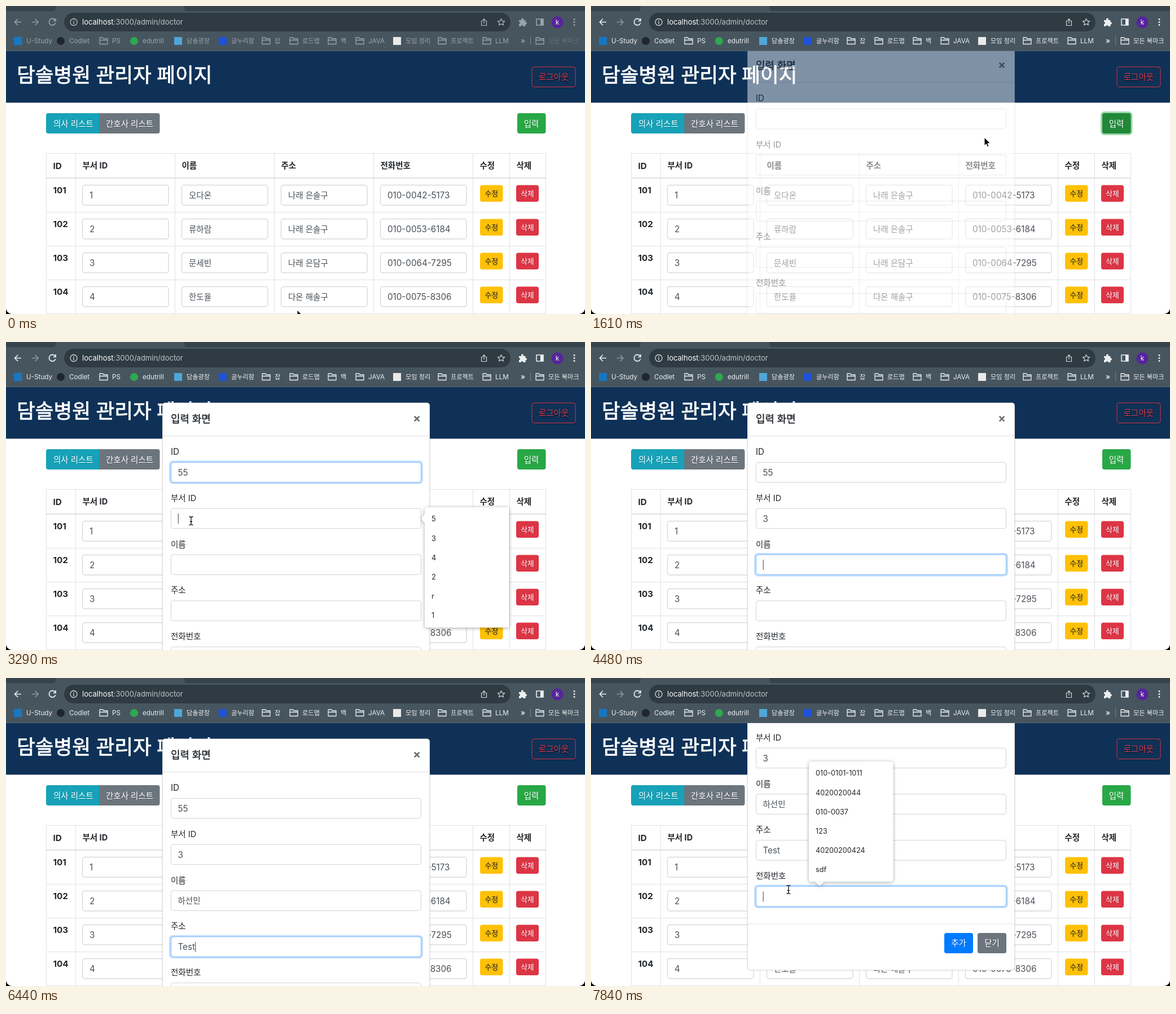
Animation, 1026 px wide and 546 px high, one loop 8 s. Source, as an HTML page:

```html
<!DOCTYPE html>
<html lang="ko">
<head>
<meta charset="utf-8">
<title>관리자 페이지</title>
<style>
  html, body { margin: 0; width: 100%; height: 100%; overflow: hidden; background: #fff; }
  svg { display: block; width: 100%; height: 100%; }
  text { font-family: Inter, "Noto Sans CJK KR", "Noto Sans KR", "Noto Sans CJK JP", sans-serif; white-space: pre; }
  .shade { text-shadow: 1px 1px 2px rgba(0, 0, 0, .15); }
  .raised { filter: drop-shadow(0 1px 1px rgba(0, 0, 0, .22)); }
  .popup { filter: drop-shadow(0 1px 3px rgba(0, 0, 0, .35)); }
</style>
</head>
<body>
<svg viewBox="0 0 1026 546">
  <defs><clipPath id="view"><rect y="80" width="1026" height="466"/></clipPath></defs>
  <g id="page"></g>
  <g id="toolbar"></g>
  <g id="live"></g>
  <path d="M0 537V546H10Q2 545 0 537ZM1026 537V546H1016Q1024 545 1026 537Z"/>
</svg>
<script>
const LOOP = 8000;
const INK = '#212529', VALUE = '#495057', LINE = '#dee2e6';
const el = id => document.getElementById(id);
const clamp = v => Math.min(1, Math.max(0, v));
const ramp = (t, start, length = 150) => clamp((t - start) / length);

// Hangul glyphs are set slightly smaller than Latin ones.
const fit = (s, size) => /[ㄱ-힣]/.test(s) ? size * .955 : size;
const text = (x, y, s, size = 15.2, fill = INK, more = '') =>
  `<text x="${x}" y="${y}" font-size="${fit(s, size)}" fill="${fill}" ${more}>${s}</text>`;
const rect = (x, y, w, h, fill, r = 0, more = '') =>
  `<rect x="${x}" y="${y}" width="${w}" height="${h}" rx="${r}" fill="${fill}" ${more}/>`;
const path = (d, stroke, more = '') => `<path d="${d}" fill="none" stroke="${stroke}" ${more}/>`;
const button = (x, y, w, h, fill, label, size = 15.2, ink = '#fff') =>
  rect(x, y, w, h, fill, 3.8) +
  text(x + w / 2, y + h / 2 + size * .36, label, size, ink, 'text-anchor="middle" class="shade"');

function drawPage() {
  const cols = [71.5, 123.5, 299.5, 475.5, 651.5, 827.5, 892.5, 956.5];
  const heads = ['ID', '부서 ID', '이름', '주소', '전화번호', '수정', '삭제'];
  const rows = [
    ['오다온', '나래 은솔구', '010-0042-5173'],
    ['류하람', '나래 은솔구', '010-0053-6184'],
    ['문세빈', '나래 은담구', '010-0064-7295'],
    ['한도율', '다온 해솔구', '010-0075-8306'],
  ];
  let s = rect(0, 0, 1026, 546, '#fff') + rect(0, 80, 1026, 91.4, '#0f3157') +
    text(19, 135, '담솔병원 관리자 페이지', 37.3, '#fff', 'font-weight="500" stroke="#fff" stroke-width=".8"') +
    rect(932, 108, 77, 35.5, 'none', 4, 'stroke="#dc3545" class="raised"') +
    text(970.5, 131, '로그아웃', 15.2, '#dc3545', 'text-anchor="middle" style="text-shadow:1px 2px 2px rgba(0,0,0,.6)"') +
    button(71, 190, 99, 36, '#17a2b8', '') +
    rect(165.5, 190, 20, 36, '#6c757d') + button(165.5, 190, 107, 36, '#6c757d', '') +
    text(84, 213.5, '의사 리스트', 15.2, '#fff', 'class="shade"') +
    text(177, 213.5, '간호사 리스트', 15.2, '#fff', 'class="shade"');
  for (const x of cols) s += path(`M${x} 261V546`, LINE);
  for (const y of [261.5, 365.5, 425.5, 485.5, 545.5]) s += path(`M71 ${y}H957`, LINE);
  s += path('M71 305H957', LINE, 'stroke-width="2"');
  heads.forEach((h, i) => s += text(cols[i] + 12, i ? 287.5 : 289, h, 15.2, INK, 'font-weight="700"'));
  rows.forEach((row, r) => {
    const y = 317.5 + 60 * r;
    s += text(83.5, y + 14.5, 101 + r, 15.2, INK, 'font-weight="700"');
    [r + 1, ...row].forEach((v, i) => {
      const x = cols[i + 1] + 12;
      s += rect(x, y, 152.5, 35.5, '#fff', 4, 'stroke="#d5dadf" stroke-width="1.4"') +
        text(x + 12.5, y + 23.5, v, 15.2, VALUE);
    });
    s += button(840, y, 40.5, 29.5, '#ffc107', '수정', 13.4, INK) +
      button(904, y, 40, 29.5, '#dc3545', '삭제', 13.4);
  });
  el('page').innerHTML = s;
}

function drawToolbar(active) {
  const ink = active ? '#eceff1' : '#9aa4aa';
  const soft = active ? '#cfd5d8' : '#b4bcc1';
  const folder = x => path(`M${x - 7} 57V67.5H${x + 7}V58H${x}L${x - 1.5} 56H${x - 7}ZM${x - 7} 60.5H${x + 7}`,
    ink, 'stroke-width="1.3" stroke-linejoin="round"');
  const square = color => x => rect(x - 7, 55, 14, 14, color);
  const dot = color => x => `<circle cx="${x}" cy="62" r="7" fill="${color}"/>`;
  const marks = [
    [21, 'U-Study', square('#1677c4')], [97, 'Codlet', dot('#20272c')], [173, 'PS', folder],
    [227, 'edutrill', dot('#2fa84f')], [305, '담솔광장', square('#4fa6da')], [384, '글누리함', square('#1f50d8')],
    [461, '잡', folder], [510, '로드맵', folder], [578, '백', folder], [627, 'JAVA', folder],
    [693, '모임 정리', square('#e9e9e9')], [773, '프로젝트', folder], [852, 'LLM', folder],
  ];
  const label = (x, s) => text(x, 66, s, 11.7, ink);
  let s = rect(0, 0, 1026, 80, '#47565e') +
    `<path d="M0 0H88V3Q88 9 82 9H0ZM316 0H1026V9H322Q316 9 316 3Z" fill="#35434b"/>` +
    rect(0, 79, 1026, 1, '#5c6a72') +
    rect(103, 12, 791, 33, '#2f3b42', 16.5) +
    path('M27 28.5H15.5M21 23L15.5 28.5L21 34', ink, 'stroke-width="1.6"') +
    path('M45.5 28.5H57M51.5 23L57 28.5L51.5 34', '#8d989e', 'stroke-width="1.6"') +
    path('M87 25A5.8 5.8 0 1 0 87.7 30M88 22V26.5H83.5', ink, 'stroke-width="1.7"') +
    `<circle cx="120" cy="28.5" r="6" fill="none" stroke="${soft}" stroke-width="1.3"/>` +
    path('M120 27.5V32M120 25V26.4', soft, 'stroke-width="1.4"') +
    text(135, 33, 'localhost<tspan fill="#bcc4c9">:3000/admin/doctor</tspan>', 13, '#fff') +
    path('M845 26.5H842.5V34.5H851.5V26.5H849M847 31V23M844.5 25.3L847 22.8L849.5 25.3', soft, 'stroke-width="1.2"') +
    path('M877.5 22.5L879.3 26.4L883.7 26.9L880.4 29.8L881.4 34L877.5 31.8L873.6 34L874.6 29.8L871.3 26.9L875.7 26.4Z',
      soft, 'stroke-width="1.2" stroke-linejoin="round"') +
    `<path d="M909 25H913V23.5A2 2 0 0 1 917 23.5V25H920.5V28.5H921A2 2 0 0 1 921 32.5H920.5V36H916.5A2 2 0 0 0 912.5 36H909V32A2 2 0 0 0 909 28Z" fill="${ink}"/>` +
    path('M940 23H952V34H940Z', ink, 'stroke-width="1.6"') + rect(947, 23, 5, 11, ink) +
    '<circle cx="977" cy="29" r="10.5" fill="#56249b"/>' +
    text(977, 33, 'k', 12, '#fff', 'text-anchor="middle"');
  for (const y of [23.5, 28.5, 33.5]) s += `<circle cx="1007" cy="${y}" r="1.5" fill="${ink}"/>`;
  for (const [x, name, icon] of marks) s += icon(x) + label(x + 15, name);
  s += text(912, 65.5, '»', 12.5, ink, 'font-weight="600"') + path('M929.5 54V69', '#76838a') +
    folder(946) + `<g opacity="${active ? 1 : .35}">${label(961, '모든 북마크')}</g>`;
  el('toolbar').innerHTML = s;
}

const labels = ['ID', '부서 ID', '이름', '주소', '전화번호'];
const openAt = 1541;
const focusAt = [2450, 3290, 4060, 5600, 7630, Infinity];
const typing = [
  [2730, 0, '5'], [2870, 0, '55'], [3500, 1, '3'],
  [4900, 2, '하'], [4970, 2, '핫'], [5040, 2, '하서'], [5110, 2, '하선'],
  [5180, 2, '하선ㅁ'], [5320, 2, '하선미'], [5390, 2, '하선민'],
  [6090, 3, 'T'], [6160, 3, 'Te'], [6370, 3, 'Tes'], [6440, 3, 'Test'],
];
const popups = [
  [2450, 2730, 386, 257, 'up', ['55', '106', '105', '12', '11', '1']],
  [3290, 3500, 742, 293, 'left', ['5', '3', '4', '2', 'r', '1']],
  [4130, 4480, 386, 419, 'up', ['sdf']],
  [6090, 6440, 386, 501, 'up', ['Test']],
  [7700, LOOP, 386, 148, 'down', ['010-0101-1011', '4020020044', '010-0037', '123', '40200200424', 'sdf']],
];
const mouse = [
  [0, 516, 539], [70, 516, 539], [840, 925, 207], [1260, 925, 207], [1610, 697, 233], [2030, 560, 234],
  [2170, 519, 230], [2940, 519, 230], [3150, 328, 317], [3710, 328, 317], [4060, 335, 394],
  [7140, 335, 394], [7560, 350, 375], [LOOP, 350, 375],
];
const hidden = [[2730, 2940], [3500, 3710], [4480, 7140]];

const pen = document.createElement('canvas').getContext('2d');
function widthOf(s) {
  pen.font = `${fit(s, 15.2)}px Inter, "Noto Sans CJK KR", "Noto Sans KR", "Noto Sans CJK JP", sans-serif`;
  return pen.measureText(s).width;
}

function modal(t, scroll) {
  const shift = -47.4 * (1 - ramp(t, openAt, 300)) ** 1.6 - scroll;
  let s = rect(277, 107.5, 474, 581.5, '#fff', 5, 'stroke="rgba(0,0,0,.2)"') +
    text(292, 143, '입력 화면', 18.8, INK, `font-weight="500" stroke="${INK}" stroke-width=".35"`) +
    path('M723.8 131.7L732.4 140.3M732.4 131.7L723.8 140.3', '#6b6b6b', 'stroke-width="2.6"') +
    path('M277 166.5H751M277 607H751', LINE);
  labels.forEach((label, i) => {
    const y = 213.3 + 81.8 * i;
    const ring = ramp(t, focusAt[i]) - ramp(t, focusAt[i + 1]);
    const value = typing.reduce((v, [at, field, str]) => field === i && t >= at ? str : v, '');
    s += text(292, y - 13.3, label) +
      rect(290.5, y - 1.5, 447, 38.5, 'none', 5.5, `stroke="#007bff" stroke-width="3" opacity="${.25 * ring}"`) +
      rect(292.5, y, 443, 35.5, '#fff', 4, 'stroke="#ced4da"') +
      rect(292.5, y, 443, 35.5, 'none', 4, `stroke="#80bdff" opacity="${ring}"`) +
      text(304.5, y + 23.5, value, 15.2, VALUE);
    if (t >= focusAt[i] && t < focusAt[i + 1])
      s += rect(304.7 + (value && widthOf(value)), y + 9, 1.1, 18, '#495057');
  });
  s += button(626, 623, 51, 36, '#007bff', '추가') + button(685, 623, 51, 36, '#6c757d', '닫기');
  return `<g clip-path="url(#view)" opacity="${ramp(t, openAt)}"><g transform="translate(0 ${shift})">${s}</g></g>`;
}

function popup([from, to, x, y, side, items]) {
  const h = items.length * 34.2 + 8;
  const tail = {
    up: `M${x + 11} ${y}l8 -7l8 7Z`,
    left: `M${x} ${y + 12}l-6 8l6 8Z`,
    down: `M${x + 11} ${y + h}l8 7l8 -7Z`,
  }[side];
  return `<g class="popup">${rect(x, y, 149.5, h, '#fff', 4)}<path d="${tail}" fill="#fff"/></g>` +
    items.map((v, i) => text(x + 12, y + 25.3 + 34.2 * i, v, 12.7)).join('');
}

function pointer(t) {
  if (hidden.some(([a, b]) => t >= a && t < b)) return '';
  const i = mouse.findIndex((m, k) => k && t <= m[0]);
  const [t0, x0, y0] = mouse[i - 1], [t1, x1, y1] = mouse[i];
  const p = (t - t0) / (t1 - t0), e = p * p * (3 - 2 * p);
  const beam = 'M-3.5 -7.5Q0 -7.5 0 -5Q0 -7.5 3.5 -7.5M0 -5V5M-3.5 7.5Q0 7.5 0 5Q0 7.5 3.5 7.5M-2 1.5H2';
  const shape = t >= 2100
    ? path(beam, '#fff', 'stroke-width="3"') + path(beam, '#111', 'stroke-width="1.3"')
    : '<path d="M0 0V14.5L3.3 11.5L5.6 16.6L8 15.5L5.8 10.6H10.4Z" stroke="#fff" stroke-width="1"/>';
  return `<g transform="translate(${x0 + (x1 - x0) * e} ${y0 + (y1 - y0) * e})">${shape}</g>`;
}

function drawLive(t) {
  const scroll = 171 * Math.sin(ramp(t, 6600, 400) * Math.PI / 2) ** 1.63;
  const ring = ramp(t, 1260) - ramp(t, 1840);
  const dark = ramp(t, 800) - ramp(t, 1840);
  let out = rect(904.5, 188.5, 53.5, 39, 'none', 5, `stroke="#28a745" stroke-width="3" opacity="${.45 * ring}"`) +
    button(906, 190, 50.5, 36, '#28a745', '') +
    rect(906, 190, 50.5, 36, '#218838', 3.8, `opacity="${dark}"`) +
    text(931, 213.5, '입력', 15.2, '#fff', 'text-anchor="middle" class="shade"');
  if (t >= openAt) out += modal(t, scroll);
  const bar = ramp(t, 6600, 50) - ramp(t, 7400, 250);
  if (bar > 0) out += rect(1019.5, 82 + 124 * scroll / 171, 6.5, 338, '#7f7f7f', 3.2, `opacity="${bar}"`);
  out += popups.filter(([a, b]) => t >= a && t < b).map(popup).join('');
  el('live').innerHTML = out + pointer(t);
}

let wasActive;
function frame(now) {
  const t = now % LOOP, active = t >= 70;
  if (active !== wasActive) drawToolbar(wasActive = active);
  drawLive(t);
  requestAnimationFrame(frame);
}
drawPage();
frame(0);
</script>
</body>
</html>
```
